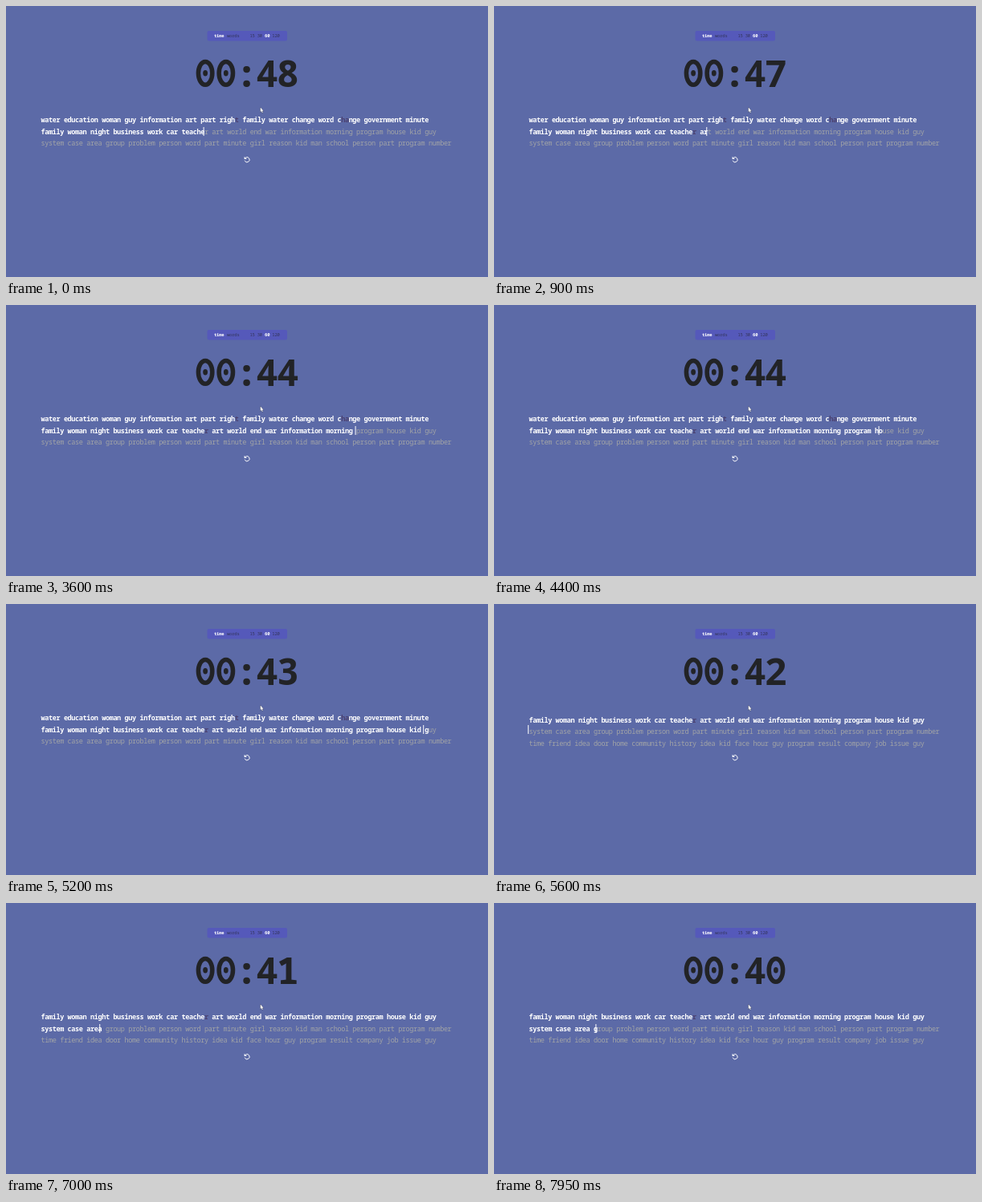
Write an HTML page with a canvas that moves like this. It is 600 by 338 pixels and loops after 8 s.

```html
<!DOCTYPE html>
<html lang="en">
<head>
<meta charset="utf-8">
<title>Typing test</title>
<style>
  html, body { margin: 0; width: 100%; height: 100%; overflow: hidden; background: #5c6aa7; }
  canvas { display: block; width: 600px; height: 338px; }
</style>
</head>
<body>
<canvas id="stage"></canvas>
<script>
const W = 600, H = 338, LOOP = 8000;
const MONO = '"Noto Sans Mono", "DejaVu Sans Mono", monospace';
const BG = '#5c6aa7', PILL = '#5559ba', INK = '#222326';
const WHITE = '#ffffff', DIM = '#a2a4a6', WRONG = '#4b4170';

const LEFT = 43.7, PITCH = 4.73, BASE = 145, LEAD = 14.6;
const ROW_LEN = 105, JUMP = 5500, JUMP_TIME = 125;

const rows = [
  { text: 'water education woman guy information art part right family water change word change government minute', wrong: [51, 79, 80] },
  { text: 'family woman night business work car teacher art world end war information morning program house kid guy', wrong: [43] },
  { text: 'system case area group problem person word part minute girl reason kid man school person part program number', wrong: [] },
  { text: 'time friend idea door home community history idea kid face hour guy program result company job issue guy', wrong: [] }
];

// [ms, characters typed since the start of the second row]
const typing = [
  [0, 43], [300, 43], [820, 47], [960, 47], [1700, 56.5], [2120, 63], [2220, 63],
  [2550, 69.3], [3400, 80.8], [3520, 83], [3620, 83], [4250, 91.6], [5130, 101],
  [5200, 102], [JUMP, 105], [5750, 105.5], [6000, 108.6], [6070, 112], [6190, 112],
  [6800, 118.8], [7010, 122], [7180, 122], [7181, 117], [7430, 117], [7880, 123], [LOOP, 123]
];

const canvas = document.getElementById('stage');
const ctx = canvas.getContext('2d');
const dpr = window.devicePixelRatio || 1;
canvas.width = W * dpr;
canvas.height = H * dpr;

const clamp = (v, lo, hi) => Math.min(hi, Math.max(lo, v));

function typedAt(t) {
  t = clamp(t, 0, LOOP);
  let i = 1;
  while (i < typing.length - 1 && t >= typing[i][0]) i++;
  const [t0, n0] = typing[i - 1], [t1, n1] = typing[i];
  return Math.floor(n0 + (n1 - n0) * (t - t0) / (t1 - t0) + 1e-6);
}

// The caret glides, trailing the typed position slightly.
function caretX(t) {
  const steps = 20, span = 90;
  let sum = 0;
  for (let i = 0; i < steps; i++) sum += typedAt(t - span * i / steps) % ROW_LEN;
  return LEFT + PITCH * sum / steps - 1;
}

function label(str, x, y, size, color, weight, step) {
  ctx.font = `${weight} ${size}px ${MONO}`;
  ctx.fillStyle = color;
  [...str].forEach((ch, i) => ctx.fillText(ch, x + (i + 0.5) * step, y));
}

function drawMenu() {
  ctx.fillStyle = PILL;
  ctx.beginPath();
  ctx.roundRect(250.5, 31, 99.5, 12.4, 2);
  ctx.fill();
  const item = (str, x, on) => label(str, x, 39, 5.5, on ? WHITE : '#34365c', on ? 700 : 400, 3.15);
  item('time', 259, true);
  item('words', 275, false);
  item('15', 303.5, false);
  item('30', 312.8, false);
  item('60', 322.1, true);
  item('120', 331.4, false);
}

function drawZero(cx) {
  ctx.strokeStyle = ctx.fillStyle = INK;
  ctx.lineWidth = 5.5;
  ctx.beginPath();
  ctx.ellipse(cx, 83.8, 8.7, 14.4, 0, 0, Math.PI * 2);
  ctx.stroke();
  ctx.beginPath();
  ctx.ellipse(cx, 83.8, 2.9, 3.7, 0, 0, Math.PI * 2);
  ctx.fill();
}

function drawTimer(t) {
  const left = 48 - Math.floor((t + 500) / 1000);
  [...('00:' + left)].forEach((ch, i) => {
    const cx = 248.1 + i * 25.7;
    if (ch === '0') drawZero(cx);
    else label(ch, cx, 100.6, 47, INK, 700, 0);
  });
}

function drawRow(row, y, typed) {
  [...row.text].forEach((ch, i) => {
    const done = i < typed;
    const color = !done ? DIM : row.wrong.includes(i) ? WRONG : WHITE;
    label(ch, LEFT + i * PITCH, y, 8.5, color, done ? 600 : 500, PITCH);
  });
}

function drawWords(t) {
  const n = typedAt(t);
  const shift = clamp((t - JUMP) / JUMP_TIME, 0, 1);
  const first = t >= JUMP ? 1 : 0;
  ctx.save();
  ctx.beginPath();
  ctx.rect(40, 134.5, 530, 44.5);
  ctx.clip();
  for (let i = first; i < 3 + first; i++) {
    const typed = i === 0 ? ROW_LEN : i === 1 ? n : i === 2 ? n - ROW_LEN : 0;
    drawRow(rows[i], BASE + (i - shift) * LEAD, typed);
  }
  ctx.restore();
  ctx.fillStyle = WHITE;
  ctx.fillRect(caretX(t) - 0.5, 151, 1, 11);
}

function drawRestart() {
  ctx.strokeStyle = ctx.fillStyle = WHITE;
  ctx.lineWidth = 1;
  ctx.beginPath();
  ctx.arc(300, 191.7, 3.1, -2.1, 2.8);
  ctx.stroke();
  ctx.beginPath();
  ctx.moveTo(296.6, 187.8);
  ctx.lineTo(296.6, 191);
  ctx.lineTo(299.8, 191);
  ctx.fill();
}

function drawPointer() {
  ctx.beginPath();
  [[316.7, 126.6], [316.7, 132.2], [318, 131.1], [318.9, 133.2], [319.8, 132.8],
   [318.9, 130.8], [320.6, 130.7]].forEach(p => ctx.lineTo(...p));
  ctx.closePath();
  ctx.lineWidth = 0.7;
  ctx.strokeStyle = '#30344c';
  ctx.stroke();
  ctx.fillStyle = WHITE;
  ctx.fill();
}

function draw(t) {
  ctx.setTransform(dpr, 0, 0, dpr, 0, 0);
  ctx.textAlign = 'center';
  ctx.textBaseline = 'alphabetic';
  ctx.fillStyle = BG;
  ctx.fillRect(0, 0, W, H);
  drawMenu();
  drawTimer(t);
  drawWords(t);
  drawRestart();
  drawPointer();
}

const start = performance.now();
function frame() {
  draw((performance.now() - start) % LOOP);
  requestAnimationFrame(frame);
}
frame();
</script>
</body>
</html>
```
